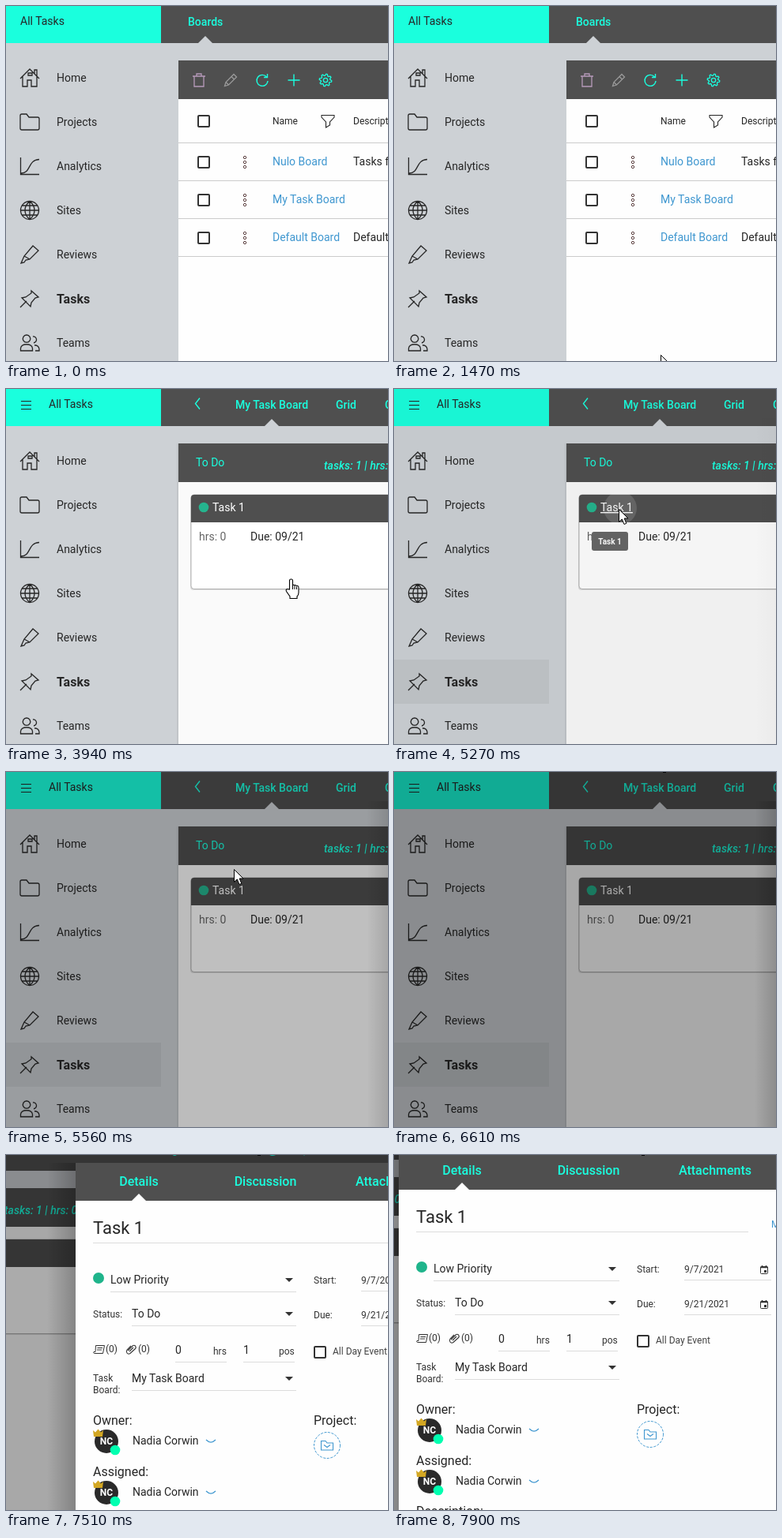
These frames come from a looping animation (483 by 450 pixels, 8000 ms). An HTML page:

```html
<!DOCTYPE html>
<html lang="en">
<head>
<meta charset="utf-8">
<title>Task board walkthrough</title>
<style>
  html, body { margin: 0; width: 100%; height: 100%; overflow: hidden; background: #cdd1d5; }
  svg { display: block; }
  text { font-family: Roboto, "Liberation Sans", sans-serif; white-space: pre; }
</style>
</head>
<body>
<svg id="stage" width="483" height="450" viewBox="0 0 483 450"></svg>
<script>
const DARK = '#4f4f4f', INK = '#262626', BG = '#cdd1d5', CYAN = '#1affdf', BLUE = '#3f97d0';
const LOOP = 8000, FULL_DIM = 0.33;

const rect = (x, y, w, h, fill, extra = '') =>
  `<rect x="${x}" y="${y}" width="${w}" height="${h}" fill="${fill}" ${extra}/>`;
const text = (x, y, s, { size = 14, fill = INK, weight = 400, extra = '' } = {}) =>
  `<text x="${x}" y="${y}" font-size="${size}" fill="${fill}" font-weight="${weight}" ${extra}>${s}</text>`;
const path = (d, stroke = INK, width = 1.3, extra = '') =>
  `<path d="${d}" fill="none" stroke="${stroke}" stroke-width="${width}" ${extra}/>`;
const disc = (x, y, r, fill, extra = '') => `<circle cx="${x}" cy="${y}" r="${r}" fill="${fill}" ${extra}/>`;
const group = (x, y, body, extra = '') => `<g transform="translate(${x} ${y})" ${extra}>${body}</g>`;
const hline = (x1, x2, y, color = '#dcdcdc') => path(`M${x1} ${y}H${x2}`, color, 1);
const checkbox = (x, y) => rect(x - 7, y - 7, 14, 14, 'none', 'stroke="#333" stroke-width="2" rx="1"');
const notch = (x, y, color) => `<path d="M${x - 9} ${y}l9 -9l9 9z" fill="${color}"/>`;

// Icons are drawn around their own centre.
const refresh = path('M5.5 -4A7 7 0 1 0 7 1M6.5 -8V-3.5H2', CYAN, 1.4);
const plus = path('M-7.5 0H7.5M0 -7.5V7.5', CYAN, 1.4);
const gearPath = () => {
  let d = '';
  for (let i = 0; i < 32; i++) {
    const a = (i + 0.5) * Math.PI / 16, r = i % 4 < 2 ? 7.8 : 5.8;
    d += `${i ? 'L' : 'M'}${(r * Math.cos(a)).toFixed(1)} ${(r * Math.sin(a)).toFixed(1)}`;
  }
  return d + 'Z';
};
const gear = path(gearPath(), CYAN) + disc(0, 0, 2.7, 'none', `stroke="${CYAN}" stroke-width="1.3"`);
const trash = path('M-8 -5H8M-3 -5V-8H3V-5M-6 -5V8H6V-5', '#b79abb');
const pencil = path('M-7.5 7.5L-6 2.5L4 -7.5L7.5 -4L-2.5 6ZM1 -4.5L4.5 -1M-6 2.5L-2.5 6', '#9a9a9a');

const menu = [
  ['Home', 'M-12 1L0 -11L12 1M-9 -2V11H-3V3H2V11H9V-2M6 -5V-10H9V-2M3 -3H-2V-6H3Z'],
  ['Projects', 'M-12 8V-8Q-12 -10 -10 -10H-4L-1 -6H10Q12 -6 12 -4V8Q12 10 10 10H-10Q-12 10 -12 8Z'],
  ['Analytics', 'M-11.5 -11V10.5H12M-11 9C2 9 -3 -8 12 -8.5'],
  ['Sites', 'M-11.5 0A11.5 11.5 0 1 1 11.5 0A11.5 11.5 0 1 1 -11.5 0ZH11.5M0 -11.5V11.5' +
    'M0 -11.5C-8 -5 -8 5 0 11.5C8 5 8 -5 0 -11.5M-9.5 -6H9.5M-9.5 6H9.5'],
  ['Reviews', 'M-11 11L-7 2L4 -11L11 -5L0 6L-5 7L-7 10ZM-7 2L0 6'],
  ['Tasks', 'M-12 11L-4 3M2 -10L11 -2L7 -1L2 5L1 10L-10 -1L-5 -2L2 -7Z'],
  ['Teams', 'M-11.5 10V7Q-11 2 -4 2Q3 2 3.5 7V10ZM-4 -10A4.7 4.7 0 1 0 -3.9 -10Z' +
    'M4 -8A4 4 0 1 1 5 0M6 3Q11.5 3 12 8V10H7'],
];
const sidebar = menu.map(([label, d], i) => {
  const y = 91 + 56 * i, active = label === 'Tasks';
  return group(30, y, path(d)) +
    text(64, y + (active ? 6 : 5), label, active ? { size: 16, weight: 700 } : {});
}).join('');

const tab = (x, label) => text(x, 25, label, { fill: CYAN, weight: 500 });

const tableRow = (y, name, about) =>
  checkbox(250, y) +
  [-6, 0, 6].map(dy => disc(302, y + dy, 1.7, 'none', 'stroke="#5b3f3f"')).join('') +
  text(337, y + 4, name, { fill: BLUE, extra: `id="${name.split(' ')[0]}"` }) +
  text(439, y + 4, about) + hline(218, 800, y + 23.5, '#cbcbcb');

const listPage = text(18, 24, 'All Tasks') + tab(230, 'Boards') + notch(252, 47, BG) +
  rect(218, 69, 700, 49, DARK) + rect(218, 118, 700, 400, '#fefefe') +
  [trash, pencil, refresh, plus, gear].map((icon, i) => group(244 + 40 * i, 94, icon)).join('') +
  checkbox(250, 146) + text(337, 150, 'Name', { size: 12 }) + text(439, 150, 'Description', { size: 12 }) +
  path('M399 138.5H415V141L409.5 147V151L404.5 154V147L399 141Z', INK, 1.1) +
  hline(218, 800, 173.5, '#cbcbcb') +
  tableRow(198, 'Nulo Board', 'Tasks for') + tableRow(246, 'My Task Board', '') +
  tableRow(294, 'Default Board', 'Default');

const boardPage = path('M19 15.5H32M19 20.5H32M19 25.5H32', INK, 1) + text(54, 24, 'All Tasks') +
  path('M245 11.5L239.5 18.5L245 25.5', CYAN, 1.4) +
  tab(290, 'My Task Board') + tab(417, 'Grid') + tab(479, 'Calendar') + tab(571, 'Backlog') + tab(657, 'Archive') +
  group(741, 20, refresh) + group(781, 20, plus) + notch(336, 47, BG) +
  rect(216, 69, 2, 460, '#000', 'opacity=".06"') +
  rect(218, 69, 700, 49, DARK) + rect(218, 118, 700, 400, '#fafafa') +
  text(240, 98, 'To Do', { fill: CYAN }) +
  text(402, 102, 'tasks: 1 | hrs: 0', { fill: CYAN, weight: 500, extra: 'font-style="italic"' }) +
  rect(233, 135, 600, 120, '#000', 'rx="4" opacity=".12"') +
  rect(234, 134, 600, 119.5, '#fff', 'rx="4" stroke="#8a8a8a" stroke-width=".6"') +
  `<path d="M234 169V138Q234 134 238 134H834V169Z" fill="${DARK}"/>` +
  '<circle id="ripple" cx="286" cy="151" r="21" fill="#fff"/>' +
  disc(250, 150, 6.3, '#25b48e') + text(261, 155, 'Task 1', { fill: '#fff', extra: 'id="taskLink"' }) +
  text(244, 192, 'hrs: 0', { fill: '#666' }) + text(309, 192, 'Due: 09/21') +
  group(0, 0, rect(250, 181, 46, 24, '#676767', 'rx="3"') +
    text(273, 196.5, 'Task 1', { size: 10, fill: '#fff', weight: 700, extra: 'text-anchor="middle"' }), 'id="tip"');

// Dialog parts
const small = (x, y, s, fill = '#333') => text(x, y, s, { size: 12, fill });
const select = (x, y, value) => text(x, y, value) + hline(x, 285, y + 10.5) +
  `<path d="M271 ${y - 7}h10l-5 5z" fill="#333"/>`;
const dateField = (y, label, value) => small(307, y, label) + small(367, y, value) + hline(367, 477, y + 9.5) +
  rect(463.5, y - 7.5, 9, 9, 'none', 'stroke="#333" rx="1"') +
  path(`M463 ${y - 6.5}h10M465.5 ${y - 9}v2M470.5 ${y - 9}v2`, '#333', 1.5) + rect(468, y - 3, 3, 3, '#333');
const numberField = (x, value, unit, unitX) => text(x, 238, value) + small(unitX, 239, unit) + hline(x, x + 65, 248.5);
const heading = (x, y, s) => text(x, y, s, { size: 16 });
const person = (y, label) => heading(28, y - 21, label) + disc(45, y, 15, '#2a2a2a') +
  text(45, y + 4, 'NC', { size: 12, fill: '#fff', weight: 700, extra: 'text-anchor="middle"' }) +
  `<path d="M28 ${y - 14}l3 2.5l3.5 -4l3.5 4l3 -2.5l-1 8h-11z" fill="#d3a723"/>` +
  disc(56, y + 11, 6.3, '#00ffb0') + text(78, y + 4, 'Nadia Corwin') +
  path(`M171 ${y - 2}q6 6 12 0`, BLUE, 1.2);

const dialog =
  rect(6, -4, 560, 500, '#fefefe') + rect(6, -4, 560, 48, DARK) + notch(86, 44, '#fefefe') +
  ['Details', 'Discussion', 'Attachments'].map((s, i) =>
    text(86 + 160 * i, 25, s, { size: 16, fill: CYAN, weight: 500, extra: 'text-anchor="middle"' })).join('') +
  text(28, 86, 'Task 1', { size: 22 }) + hline(28, 448, 97.5) + small(477, 92, 'More', BLUE) +
  disc(35, 142, 7, '#1fb48b') + select(50, 149, 'Low Priority') + dateField(149, 'Start:', '9/7/2021') +
  small(28, 192, 'Status:') + select(77, 192, 'To Do') + dateField(193, 'Due:', '9/21/2021') +
  path('M31.5 227.5H42.5L40.5 237.5H29.5Q28 237 29 235.5H31ZM33.5 230.5H40M33 233H39', '#333', 1) + small(44, 236, '(0)') +
  path('M72 234L78 228Q80 226.500 81.500 228Q83 230 81.500 231.500L75 237.500Q72.500 239 71 237Q69.500 235 71 233L76 228M74 235L79 230', '#333', 1.1) +
  small(85, 236, '(0)') + numberField(132, '0', 'hrs', 180) + numberField(218, '1', 'pos', 263) +
  checkbox(315, 236) + small(331, 239, 'All Day Event', '#444') +
  small(28, 273, 'Task') + small(28, 288, 'Board:') + select(77, 274, 'My Task Board') +
  person(349, 'Owner:') + heading(307, 328, 'Project:') +
  disc(324, 354, 16.5, 'none', `stroke="${BLUE}" stroke-dasharray="3 1.6"`) +
  path('M316.500 360V348.500H322L324 351H331.500V360ZM320 353.500L324 356.500L328 353.500', BLUE, 1.1) +
  person(414, 'Assigned:') + heading(28, 457, 'Description:');

const arrow = '<path d="M.5 .5V16.500L4.300 13L7 19.500L9.800 18.300L7.200 12H12Z" fill="#fff" stroke="#000"/>';
const hand = '<path d="M-1.500 13V2Q-1.500 0 .5 0Q2.500 0 2.500 2V8Q3.500 6.500 5 8Q6.500 7 7.500 8.700Q10 8 10 11V17' +
  'Q10 20 8 22V24.500H-1V22L-5.500 15.500Q-6.500 13 -4.500 12.500Z" fill="#fff" stroke="#000" stroke-width="1.1"/>' +
  path('M2.500 8V13M5 8.500V13M7.500 9.500V13', '#000', 1);

document.getElementById('stage').innerHTML =
  '<defs><linearGradient id="shade"><stop offset="0" stop-opacity="0"/><stop offset="1" stop-opacity=".22"/></linearGradient></defs>' +
  group(0, 0,
    rect(0, 0, 1100, 520, BG) + rect(196, 0, 900, 47, DARK) + rect(0, 0, 196, 47, '#1affdd') +
    rect(0, 343, 196, 56, '#c3c7ca', 'id="active"') + sidebar +
    group(0, 0, listPage, 'id="list"') + group(0, 0, boardPage, 'id="board"') +
    rect(0, 0, 1100, 520, '#000', 'id="dim"') +
    group(0, 0, rect(456, 37, 36, 480, 'url(#shade)') + group(486, 41, dialog), 'id="dialog"'), 'id="scene"') +
  rect(0, 0, 4, 1, '#000', 'id="speck"') +
  group(0, 0, arrow, 'id="arrow"') + group(0, 0, hand, 'id="hand"');

const el = id => document.getElementById(id);
const show = (id, on) => el(id).setAttribute('visibility', on ? 'visible' : 'hidden');
const underline = (id, on) => el(id).setAttribute('text-decoration', on ? 'underline' : 'none');
const moveTo = (id, x, y) => el(id).setAttribute('transform', `translate(${x} ${y})`);
const during = (t, from, to) => t >= from && t < to;
const latest = (steps, t) => steps.filter(s => s[0] <= t).pop();

// time, x, y, pointer
const pointer = [
  [0, -50, -50, 'arrow'], [1470, 337, 442, 'arrow'], [1590, 343, 404, 'arrow'], [1710, 347, 351, 'arrow'],
  [1830, 352, 308, 'arrow'], [1950, 356, 285, 'hand'], [2070, 358, 266, 'arrow'],
  [2220, 359, 254, 'hand'], [2340, 360, 247, 'hand'], [2460, 360, 243, 'hand'], [2580, 360, 241, 'hand'],
  [4470, 347, 235, 'arrow'], [4590, 319, 220, 'arrow'], [4740, 301, 179, 'arrow'],
  [4890, 289, 158, 'arrow'], [5010, 284, 152, 'arrow'],
  [5560, 288, 123, 'arrow'], [5680, 298, 70, 'arrow'], [5800, 306, 23, 'arrow'],
  [5940, 308, -1, 'arrow'], [6090, 309, -50, 'arrow'],
];
const dimming = [[0, 0], [5270, 0.04], [5400, 0.15], [5560, 0.25], [5680, 0.31], [5800, FULL_DIM]];

function draw(t) {
  const onBoard = t >= 3940;
  show('list', !onBoard);
  show('board', onBoard);
  show('active', t >= 5270);
  underline('Default', during(t, 1950, 2070));
  underline('My', during(t, 2220, 3940));
  underline('taskLink', during(t, 4890, 5560));
  show('tip', during(t, 5010, 5560));
  el('ripple').setAttribute('opacity', during(t, 5270, 5400) ? 0.14 : during(t, 5400, 5560) ? 0.06 : 0);

  const dim = latest(dimming, t)[1];
  el('dim').setAttribute('opacity', dim);
  el('dialog').setAttribute('opacity', dim / FULL_DIM);

  // The camera pans in ten even ticks: easing out sideways, easing both ways downwards.
  const u = Math.min(10, Math.max(0, Math.floor((t - 6610) / 129))) / 10;
  const slide = 1 - (1 - u) ** 1.946;
  moveTo('scene', -Math.round(486 * slide), -Math.round(41 * u * u * (3 - 2 * u)));
  show('speck', t >= 6610);
  el('speck').setAttribute('x', Math.round(340 - 27 * slide));

  const [, x, y, kind] = latest(pointer, t);
  for (const id of ['arrow', 'hand']) {
    show(id, id === kind);
    moveTo(id, x, y);
  }
}

function tick() {
  draw(performance.now() % LOOP);
  requestAnimationFrame(tick);
}
tick();
</script>
</body>
</html>
```
